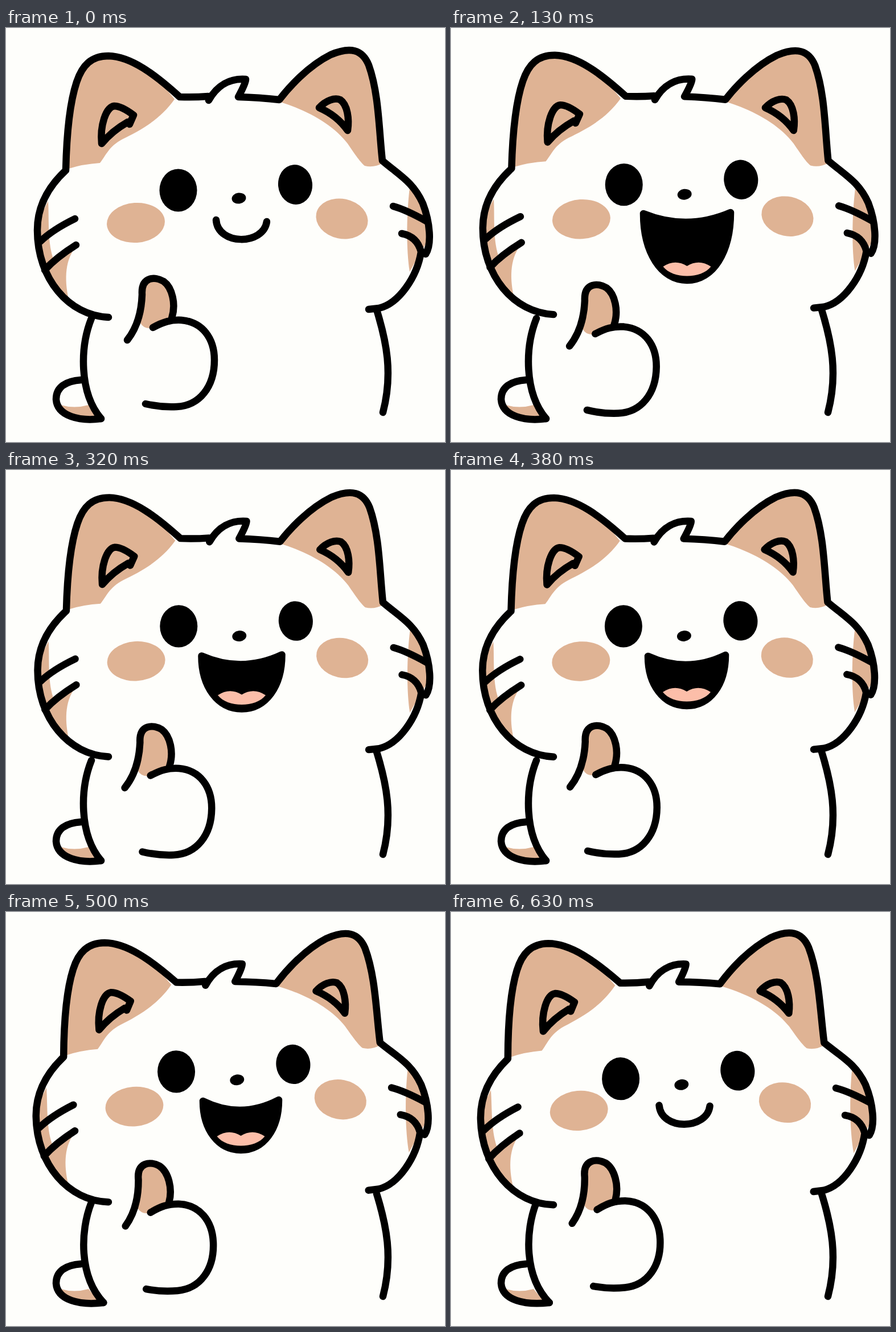
An HTML page that plays this animation: 771 px wide and 727 px high, repeating every 0.69 s.

```html
<!DOCTYPE html>
<html lang="en">
<head>
<meta charset="utf-8">
<title>Thumbs-up cat</title>
<style>
  html, body { margin: 0; width: 100%; height: 100%; overflow: hidden; background: #fefefb; }
  svg { display: block; width: 100%; height: 100%; }
  .line { fill: none; stroke: #000; stroke-width: 12.5; stroke-linecap: round; stroke-linejoin: round; }
  .fur { fill: #dfb394; }
  .tongue { fill: #fcbea9; }
</style>
</head>
<body>
<svg viewBox="0 0 771 727" preserveAspectRatio="none">
  <!-- body and tail -->
  <path class="fur" d="M96 662Q120 669 145 662L166 687C130 690 106 682 96 662Z"/>
  <g class="line">
    <path id="side"/>
    <path id="tail"/>
    <path d="M651 495C668 550 680 606 662 675"/>
  </g>

  <g id="head">
    <g class="fur">
      <path d="M110 247L108 190C110 90 135 49 180 49C220 50 262 82 296 125C270 162 235 180 205 195C180 208 175 225 165 237Q135 239 110 247Z"/>
      <path d="M482 130C530 145 575 170 600 203C615 225 622 235 630 242Q646 246 662 237C656 200 656 150 645 100C632 20 595 37 570 50C535 68 505 95 482 130Z"/>
      <path d="M74 304C76 335 72 380 85 410L124 383C104 405 102 440 110 476C70 450 50 380 58 335Z"/>
      <path d="M709 280C703 330 703 390 709 428L728 394L743 370L736 320Z"/>
    </g>
    <g class="line">
      <path d="M180 508C110 505 55 440 55 355C55 310 78 275 105 250C106 205 109 140 124 95C134 65 150 49 180 49C220 50 262 82 305 121Q330 122 355 120"/>
      <path d="M356 127C371 100 394 88 421 90Q422 95 408 121Q445 122 480 126C497 104 530 67 570 47C605 32 626 38 637 65C655 115 655 180 661 233C690 258 715 270 732 308C745 342 748 380 737 397"/>
      <path d="M695 361Q722 366 729 393C722 437 690 484 655 492L637 494"/>
      <path d="M680 313Q702 319 738 339"/>
      <path d="M60 375Q82 354 121 335M68 425Q88 403 123 381"/>
      <path d="M168 203C165 172 175 139 190 137Q203 137 224 153L217 169M214 165Q186 181 168 203"/>
      <path d="M550 140C562 127 577 122 587 126C600 135 603 160 600 180C588 163 573 150 550 140Z"/>
    </g>
    <g id="cheeks" class="fur">
      <ellipse cx="228" cy="342" rx="51" ry="35" transform="rotate(-4 228 342)"/>
      <ellipse cx="590" cy="335" rx="46" ry="35" transform="rotate(12 590 335)"/>
    </g>
    <g id="eyes">
      <ellipse cx="302.5" cy="285" rx="33" ry="37.5"/>
      <ellipse cx="508" cy="275" rx="30" ry="35" transform="rotate(-6 508 275)"/>
    </g>
    <ellipse id="nose" cx="409" cy="299" rx="12.5" ry="9.5" transform="rotate(-8 409 299)"/>
    <path id="smile" class="line" d="M369 337C372 382 452 382 458 340"/>
  </g>

  <g id="open">
    <path id="mouth" class="line" style="fill:#000"/>
    <path id="tongue" class="tongue"/>
  </g>

  <g id="hand">
    <path class="fur" d="M239 465C238 436 262 436 277 445C292 456 299 485 291 510L258 526Q243 530 236 518Q240 495 239 465Z"/>
    <g class="line">
      <path d="M213 548C232 524 238 497 239 468C237 436 262 436 277 445C292 456 299 485 291 510"/>
      <path d="M258 526C276 516 290 512 308 513C345 516 366 545 366 583C366 630 340 663 300 665C280 666 262 664 245 660"/>
    </g>
  </g>
</svg>
<script>
const $ = id => document.getElementById(id);
const LOOP = 690;
const starts = [0, 70, 130, 190, 250, 320, 380, 440, 500, 570, 630];

// step, head turn, head squash, face lift, hand x, hand y, hand turn,
// mouth: left, right, corner, dip, bottom
const keys = [
  [0, 0, 1, 0, 0, 0, 0, 350, 480, 333, 352, 414],
  [1, .2, .995, -5.5, -3, 7, .3, 350, 480, 333, 352, 414],
  [2, .3, .992, -7.5, -5, 11, .6, 338, 491, 325, 341, 443],
  [4, .3, .992, -8.3, -5, 12, .6, 341, 487, 325, 341, 425],
  [6, .1, .991, -8.7, -4, 9, .5, 346, 482, 326, 342, 414],
  [8, -.85, .992, -6, -3, 2, -2.3, 346, 479, 331, 348, 418],
  [10, -1.15, 1, 4, 0, -3, -2.8, 344, 476, 338, 352, 414]
];

function poseAt(step) {
  const n = Math.max(1, keys.findIndex(k => k[0] >= step));
  const a = keys[n - 1], b = keys[n];
  const p = (step - a[0]) / (b[0] - a[0]);
  return a.map((v, i) => v + (b[i] - v) * p);
}

function drawMouth(l, r, c, dip, b) {
  const m = (l + r) / 2, h = (r - l) / 2, low = c + (b - c) * .58;
  $('mouth').setAttribute('d',
    `M${l} ${c + 1}Q${m} ${2 * dip - c} ${r} ${c - 1}` +
    `C${r} ${low} ${m + h * .6} ${b} ${m} ${b}` +
    `C${m - h * .6} ${b} ${l} ${low} ${l} ${c + 1}Z`);
  const w = 42, y = b - 24;
  $('tongue').setAttribute('d',
    `M${m - w} ${y}Q${m - w / 2} ${y - 14} ${m} ${y - 1}Q${m + w / 2} ${y - 14} ${m + w} ${y}` +
    `C${m + w * .6} ${y + 22} ${m - w * .6} ${y + 22} ${m - w} ${y}Z`);
}

function draw(step) {
  const [, turn, squash, lift, hx, hy, hturn, ...mouth] = poseAt(step);
  const set = (id, value) => $(id).setAttribute('transform', value);
  set('head', `rotate(${turn} 490 510) translate(0 ${100 * (1 - squash)}) scale(1 ${squash})`);
  set('eyes', `translate(0 ${lift})`);
  set('nose', `translate(0 ${lift * .65}) rotate(-8 409 299)`);
  set('cheeks', `translate(0 ${lift * .4})`);
  set('hand', `translate(${hx} ${hy}) rotate(${hturn} 250 555)`);

  const tip = 167 + Math.max(0, -turn * 5);
  $('side').setAttribute('d', `M150 510C130 560 128 640 ${tip} 686`);
  $('tail').setAttribute('d', `M132 618C105 620 88 630 88 652C90 682 130 691 ${tip} 686`);

  const smiling = step === 0 || step === 10;
  $('smile').style.display = smiling ? '' : 'none';
  $('open').style.display = smiling ? 'none' : '';
  drawMouth(...mouth);
}

function tick() {
  const t = performance.now() % LOOP;
  draw(starts.findLastIndex(s => s <= t));
  requestAnimationFrame(tick);
}
tick();
</script>
</body>
</html>
```
